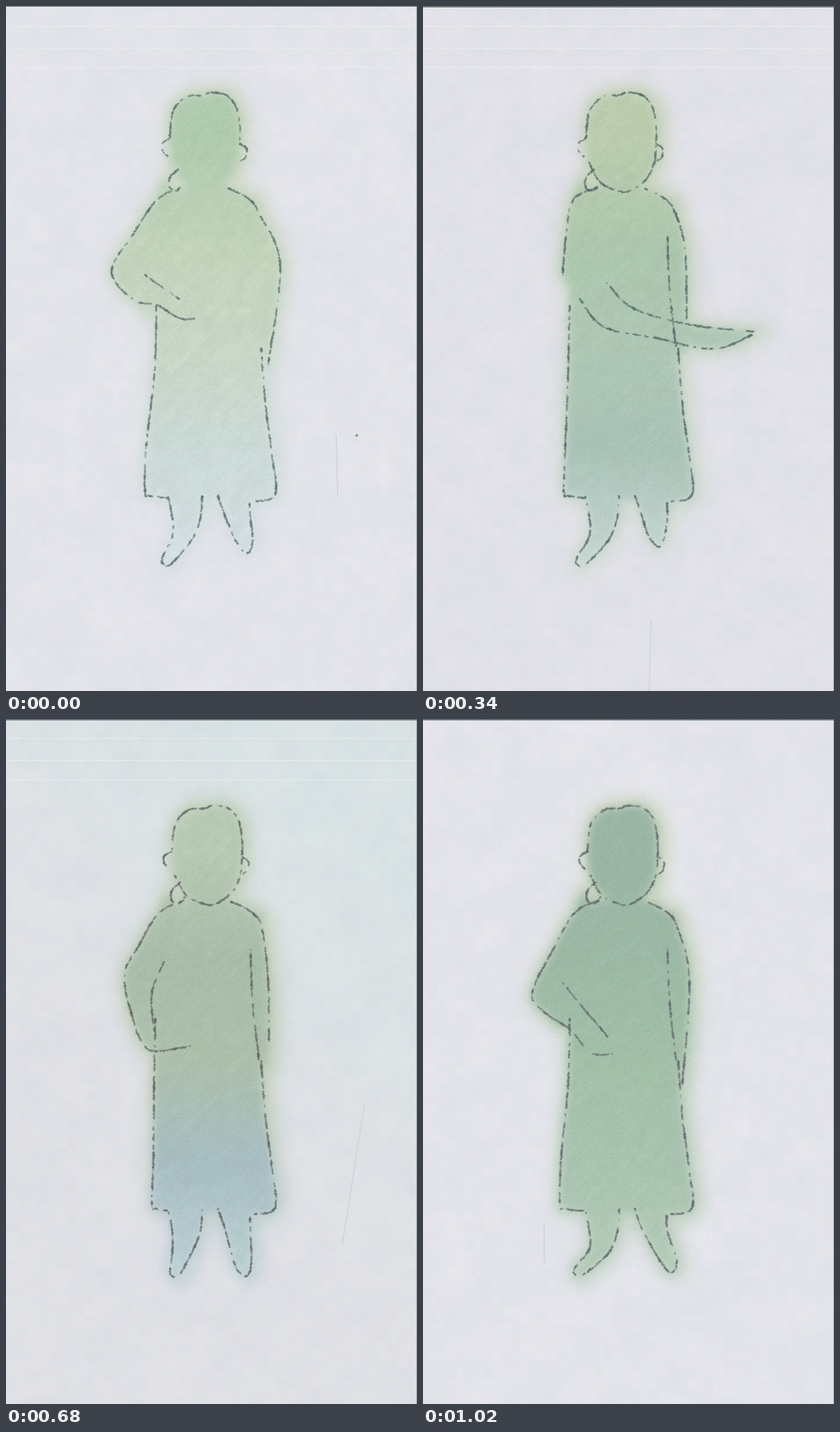
These frames come from a looping animation (580 by 965 pixels, 1190 ms). An HTML page with a canvas:

```html
<!DOCTYPE html>
<html lang="en">
<head>
<meta charset="utf-8">
<title>Pastel figure</title>
<style>
html, body { margin: 0; width: 100%; height: 100%; overflow: hidden; background: #e3e4ea; }
canvas { display: block; width: 580px; height: 965px; }
</style>
</head>
<body>
<canvas id="stage" width="580" height="965"></canvas>
<script>
const W = 580, H = 965, HOLD = 170;
const stage = document.getElementById('stage').getContext('2d');

// One body is shared; a pose moves its joints and changes its pastels.
// elbow, under, fold: the arm across the body. right: elbow and hand of the other arm.
// side: left edge of the dress at waist and hem. core and halo: colours from head to feet.
const poses = [
  {
    headX: 281, ears: 2, elbow: [149, 374], under: [[180, 414], [213, 421], [245, 440], [268, 440]], fold: [[196, 379], [245, 413]],
    right: [[387, 365], [370, 505]], side: [212, 196], toes: [[221, 786], [340, 771]],
    core: ['#acc9ac', '#bfd1b7', '#c7d5c3', '#c9d8d5', '#d1dce0'], halo: ['#c7d4b8', '#cbd9cf', '#d5dee2'],
    paper: '#e3e4ea', ink: '#5c7672', edge: 1, scan: 59, scratch: [466, 605, 468, 690], speck: [495, 605]
  },
  {
    headX: 279, ears: 1, jaw: true, elbow: [171, 374], under: [[195, 408], [262, 435], [345, 448], [362, 470], [388, 474], [386, 428], [345, 434]],
    fold: [[226, 380], [326, 427]], right: [[371, 340], [371, 400]], side: [206, 203], toes: [[214, 784], [346, 770]],
    core: ['#ccd6bf', '#c9d5bb', '#cad6bf', '#c6d8d2', '#d1dee1'], halo: ['#c8d9d0', '#c9d9cd', '#ccdbdb'],
    paper: '#e3e3e9', ink: '#5f7b76', edge: 1, scan: 58, scratch: [380, 610, 460, 628], speck: [123, 207]
  },
  {
    headX: 280, ears: 2, jaw: true, seam: true, elbow: [197, 380], under: [[221, 412], [255, 452], [330, 468], [410, 483], [465, 463]],
    fold: [[260, 390], [295, 425], [372, 448], [467, 459]], right: [[370, 345], [372, 445]], side: [207, 199], toes: [[217, 787], [333, 762]],
    core: ['#b8cbab', '#a9c4aa', '#aac4b1', '#a5bfb4', '#c0d2cd'], halo: ['#c0d0b0', '#c8d5c3', '#cedacf'],
    paper: '#e1e1e8', ink: '#566f6a', edge: 2, scan: 59, scratch: [322, 865, 319, 965]
  },
  {
    headX: 283, ears: 2, seam: true, elbow: [197, 392], under: [[245, 433], [280, 483], [325, 490]], fold: [[206, 350], [222, 406]],
    right: [[367, 335], [366, 388]], side: [216, 201], toes: [[229, 799], [345, 771]],
    core: ['#98b298', '#8da691', '#94ada2', '#95b1af', '#a6c1c5'], halo: ['#b0c99f', '#abc4bb', '#aec8cb'],
    paper: '#e0e0e6', ink: '#616764', edge: 2, scan: 60, scratch: [41, 895, 44, 965]
  },
  {
    headX: 284, ears: 2, jaw: true, seam: true, elbow: [167, 362], under: [[180, 425], [192, 455], [210, 468], [260, 461]],
    fold: [[225, 338], [206, 385], [209, 440]], right: [[370, 370], [371, 455]], side: [211, 206], toes: [[232, 784], [338, 785]],
    core: ['#b5c8b0', '#a4b9a7', '#a9bda9', '#a4bac0', '#b8cdd1'], halo: ['#bfcfb9', '#becdb2', '#bdd0d4'],
    paper: '#dfe0e5', tint: '#d9e2e4', ink: '#626866', edge: 2, scan: 58, scratch: [506, 541, 475, 738]
  },
  {
    headX: 287, ears: 2, seam: true, elbow: [137, 362], under: [[150, 440], [160, 466], [178, 474], [208, 468]],
    fold: [[188, 372], [203, 360], [212, 400]], right: [[378, 380], [378, 488]], side: [211, 201], toes: [[242, 792], [343, 780]],
    core: ['#b1c8bd', '#b4cabd', '#bacbb9', '#b9cecd', '#cbdadd'], halo: ['#b9d0c6', '#c2d2c2', '#ccdadd'],
    paper: '#e2e3ea', ink: '#545b5b', edge: 3, scratch: [135, 465, 73, 578], speck: [482, 8]
  },
  {
    headX: 282, ears: 2, jaw: true, seam: true, elbow: [154, 386], under: [[170, 412], [208, 438], [236, 470], [268, 472]],
    fold: [[198, 372], [220, 400], [262, 449]], right: [[376, 368], [366, 515]], side: [207, 193], toes: [[214, 783], [350, 780]],
    core: ['#94b1a0', '#97b5a2', '#9ebca4', '#a5c1ad', '#b0c8b4'], halo: ['#c3d3b3', '#b6cdb4', '#bed0c0'],
    paper: '#e3e4ea', ink: '#666c70', edge: 2, scratch: [171, 710, 171, 765]
  }
];

function seeded(seed) {
  return () => {
    seed = (seed + 0x6D2B79F5) | 0;
    let t = Math.imul(seed ^ (seed >>> 15), 1 | seed);
    t ^= t + Math.imul(t ^ (t >>> 7), 61 | t);
    return ((t ^ (t >>> 14)) >>> 0) / 4294967296;
  };
}

function layer() {
  const canvas = document.createElement('canvas');
  canvas.width = W;
  canvas.height = H;
  return canvas.getContext('2d', { willReadFrequently: true });
}

// Smooth noise in -1..1 on a wrapping 64 x 64 lattice.
function cloud(random) {
  const grid = Array.from({ length: 4096 }, () => random() * 2 - 1);
  const at = (i, j) => grid[(i & 63) + (j & 63) * 64];
  const ease = t => t * t * (3 - 2 * t);
  return (x, y) => {
    const i = Math.floor(x), j = Math.floor(y), u = ease(x - i), v = ease(y - j);
    const top = at(i, j) + (at(i + 1, j) - at(i, j)) * u;
    const low = at(i, j + 1) + (at(i + 1, j + 1) - at(i, j + 1)) * u;
    return top + (low - top) * v;
  };
}

function eachPixel(ctx, change) {
  const image = ctx.getImageData(0, 0, W, H);
  for (let y = 0, i = 0; y < H; y++)
    for (let x = 0; x < W; x++, i += 4) change(image.data, i, x, y);
  ctx.putImageData(image, 0, 0);
}

// Catmull-Rom samples about one pixel apart.
function smooth(points) {
  const out = [], at = i => points[Math.max(0, Math.min(points.length - 1, i))];
  for (let i = 0; i < points.length - 1; i++) {
    const [a, b, c, d] = [at(i - 1), at(i), at(i + 1), at(i + 2)];
    const steps = Math.ceil(Math.hypot(c[0] - b[0], c[1] - b[1]));
    for (let s = 0; s < steps; s++) {
      const t = s / steps;
      out.push([0, 1].map(k => b[k] + 0.5 * t * (c[k] - a[k] +
        t * (2 * a[k] - 5 * b[k] + 4 * c[k] - d[k] + t * (3 * (b[k] - c[k]) + d[k] - a[k])))));
    }
  }
  return out;
}

// Outlines for the crayon and closed regions for the pastel.
function buildBody({ headX, ears, jaw, seam, elbow, under, fold, right, side, toes }) {
  const onHead = points => points.map(([x, y]) => [headX + x, 190 + y]);
  const crown = onHead([[-50, -3], [-45, -42], [-26, -62], [-4, -64], [8, -68], [30, -64], [44, -47], [49, -20], [49, 2]]);
  const chin = onHead([[49, 8], [46, 32], [34, 55], [10, 71], [-6, 70], [-30, 58], [-46, 30]]);
  const leftEar = onHead([[-51, -3], [-61, 4], [-60, 14], [-53, 22]]);
  const rightEar = onHead([[49, 4], [58, 11], [57, 23], [50, 28]]);
  const bun = onHead([[-38, 40], [-50, 52], [-50, 66], [-40, 70], [-31, 60]]);
  const [neck, shoulder] = onHead([[-34, 66], [-68, 83]]);
  const rightShoulder = onHead([[33, 67], [62, 82], [77, 104]]);

  const upperArm = [neck, shoulder, [(shoulder[0] + elbow[0]) / 2 - 3, (shoulder[1] + elbow[1]) / 2], elbow];
  const bent = elbow[0] < 190;
  const arm = bent ? [...upperArm, ...under] : upperArm;
  const leftEdge = [[side[0], 422], [side[0] - 2, 510], [side[1] + 2, 620], [side[1], 684], [side[1] + 6, 690], [228, 693]];
  const rightEdge = [[360, 482], [366, 560], [375, 630], [380, 688], [350, 698]];

  const [[lx, ly], [rx, ry]] = toes;
  const leftLeg = [[229, 692], [234, 716], [235, 746], [lx, ly - 9], [lx + 1, ly], [lx + 12, ly], [262, 752], [274, 722], [277, 690]];
  const rightLeg = [[299, 690], [309, 718], [rx - 15, ry - 16], [rx, ry], [rx + 8, ry - 16], [345, 722], [344, 700]];

  const lines = [crown, leftEar, bun, arm, fold, [...rightShoulder, ...right], leftEdge, rightEdge, leftLeg, rightLeg];
  if (ears > 1) lines.push(rightEar);
  if (jaw) lines.push(chin);
  if (!bent) lines.push(under);
  if (seam) lines.push([[345, 325], [348, 400], [357, 480]]);

  const regions = [
    [...crown, ...chin],
    [...bun, neck, ...rightShoulder, ...rightEdge, ...leftEdge.slice().reverse(), shoulder],
    [...upperArm, under[0], leftEdge[0]],
    [...under, ...fold.slice().reverse()],
    [...rightShoulder, ...right, rightEdge[0]],
    leftLeg, rightLeg
  ];
  return { lines, regions };
}

function drawSegment(ctx, x1, y1, x2, y2, width, color) {
  ctx.strokeStyle = color;
  ctx.lineWidth = width;
  ctx.lineCap = 'round';
  ctx.beginPath();
  ctx.moveTo(x1, y1);
  ctx.lineTo(x2, y2);
  ctx.stroke();
}

function drawPaper(ctx, { paper, tint, scan }, random) {
  ctx.fillStyle = paper;
  ctx.fillRect(0, 0, W, H);
  if (tint) {
    const shade = ctx.createLinearGradient(300, 600, W, 300);
    shade.addColorStop(0, tint + '00');
    shade.addColorStop(1, tint);
    ctx.fillStyle = shade;
    ctx.fillRect(0, 0, W, H);
  }
  const mottle = cloud(random);
  eachPixel(ctx, (d, i, x, y) => {
    const n = mottle(x / 44, y / 44) * 1.6 + mottle(x / 13, y / 13) * 1.5 + (random() - 0.5) * 4;
    for (let c = 0; c < 3; c++) d[i + c] += n * (1.3 - c * 0.25);
  });
  if (scan) {
    ctx.fillStyle = 'rgba(238,243,241,.6)';
    for (const offset of [-31, 0, 27]) ctx.fillRect(0, scan + offset, W, 1);
  }
}

function drawRegions(regions, grow) {
  const ctx = layer();
  ctx.lineWidth = grow * 2;
  ctx.lineJoin = 'round';
  for (const region of regions) {
    const path = new Path2D();
    smooth([...region, region[0]]).forEach(p => path.lineTo(...p));
    path.closePath();
    ctx.fill(path);
    if (grow) ctx.stroke(path);
  }
  return ctx.canvas;
}

function drawPastel(regions, colors, grow, blur, strength, random) {
  const ctx = layer();
  ctx.filter = `blur(${blur}px)`;
  ctx.drawImage(drawRegions(regions, grow), grow * 0.3, 0);
  ctx.filter = 'none';
  ctx.globalCompositeOperation = 'source-in';
  const fill = ctx.createLinearGradient(0, 190, 0, 770);
  colors.forEach((color, i) => fill.addColorStop(i / (colors.length - 1), color));
  ctx.fillStyle = fill;
  ctx.fillRect(0, 0, W, H);

  // Speckled rim, with streaks along the rubbing direction inside.
  const streak = cloud(random);
  eachPixel(ctx, (d, i, x, y) => {
    const a = d[i + 3] / 255;
    if (!a) return;
    const grain = random() - 0.5;
    const rub = streak((x + y) / 9, (x - y + H) / 38) + streak(x / 11, y / 11);
    d[i + 3] = 255 * strength * (a + grain * 2.2 * a * (1 - a)) * (0.95 + rub * 0.05);
    for (let c = 0; c < 3; c++) d[i + c] += grain * 13 + rub * 3;
  });
  return ctx.canvas;
}

function drawCrayon(ctx, points, ink, random) {
  const phase = random() * 40;
  ctx.fillStyle = ink;
  smooth(points).forEach(([x, y], i) => {
    const s = i + phase;
    const press = Math.sin(s * 0.47) + Math.sin(s * 0.19 + 1) + Math.sin(s * 0.061 + phase) * 0.9;
    if (press < -0.9) return;
    ctx.globalAlpha = 0.25 + random() * 0.3 + press * 0.05;
    ctx.beginPath();
    ctx.arc(x + random() * 1.4 - 0.7, y + random() * 1.4 - 0.7, 1.2 + press * 0.2 + random() * 0.3, 0, 7);
    ctx.fill();
  });
  ctx.globalAlpha = 1;
}

function drawPose(pose, seed) {
  const random = seeded(seed), ctx = layer();
  const { lines, regions } = buildBody(pose);
  drawPaper(ctx, pose, random);
  ctx.drawImage(drawPastel(regions, pose.halo, 13, 10, 0.8, random), 0, 0);
  ctx.drawImage(drawPastel(regions, pose.core, 0, 6, 0.95, random), 0, 0);
  drawSegment(ctx, ...pose.scratch, 1.5, '#c8d6d9');
  if (pose.speck) drawSegment(ctx, ...pose.speck, ...pose.speck, 4, '#7fa48d');
  for (const line of lines) drawCrayon(ctx, line, pose.ink, random);

  ctx.fillStyle = '#6b7878';
  ctx.fillRect(0, pose.edge > 2 ? 1 : 0, W, pose.edge);
  ctx.globalAlpha = 0.5;
  ctx.fillRect(W - 1, 0, 1, H);
  return ctx.canvas;
}

const sheets = poses.map((pose, i) => drawPose(pose, 101 + i * 37));

function render() {
  const index = Math.floor(performance.now() / HOLD) % sheets.length;
  stage.drawImage(sheets[index], 0, 0);
  requestAnimationFrame(render);
}
render();
</script>
</body>
</html>
```
